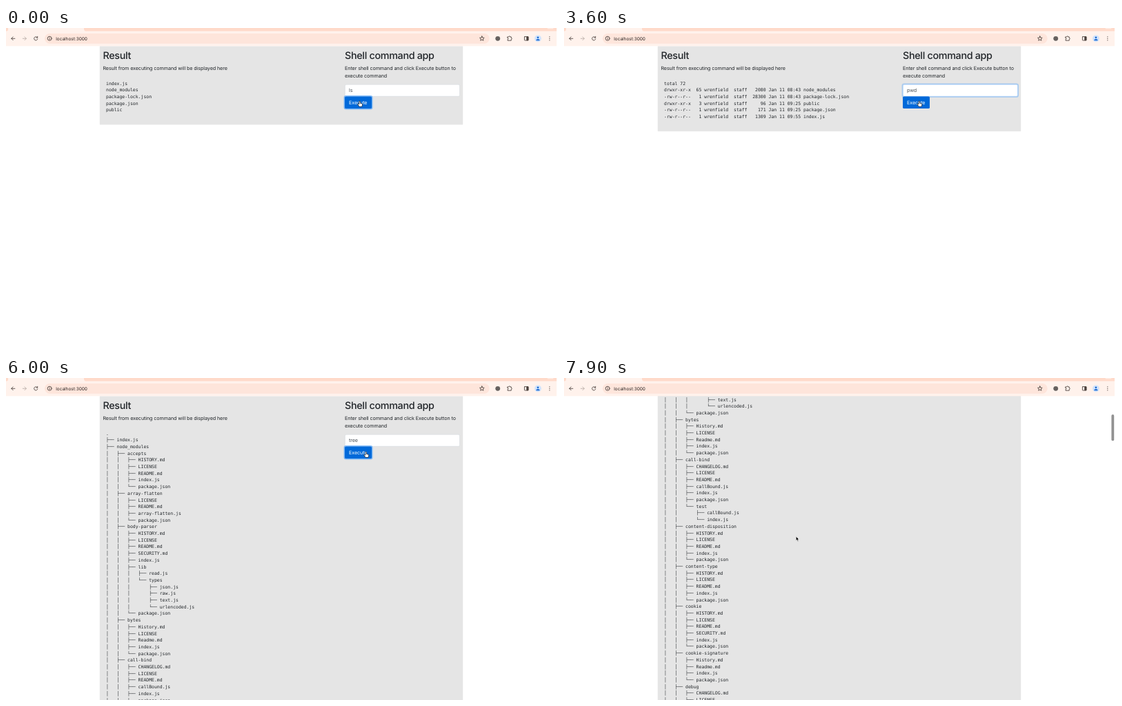
An HTML page that plays this animation: 800 px wide and 468 px high, repeating every 8 s.

```html
<!DOCTYPE html>
<html lang="en">
<head>
<meta charset="utf-8">
<title>Shell command app</title>
<style>
  html, body { margin: 0; width: 100%; height: 100%; overflow: hidden; background: #fff; }
  svg { display: block; width: 800px; height: 468px; }
  text { font: 7.16px Inter, "Open Sans", sans-serif; letter-spacing: -.0105em; fill: #212529;
         text-rendering: geometricPrecision; white-space: pre; }
  .head { font-size: 14.33px; font-weight: 500; letter-spacing: -.022em; }
  .mono text { font: 6.467px "DejaVu Sans Mono", monospace; letter-spacing: 0; }
  .url { font-size: 6.47px; letter-spacing: 0; fill: #2b2523; }
  .field { fill: #495057; }
  .label { fill: #fff; }
  .icon { fill: none; stroke: #463d39; stroke-width: .85; stroke-linecap: round; stroke-linejoin: round; }
</style>
</head>
<body>
<svg viewBox="0 0 800 468">
  <g id="page">
    <rect id="panel" x="135.8" y="26.3" width="526.4" fill="#e5e5e5"/>
    <text class="head" x="140.4" y="45">Result</text>
    <text x="140.4" y="60.5">Result from executing command will be displayed here</text>
    <g id="out" class="mono"></g>
    <text class="head" x="491" y="45">Shell command app</text>
    <text x="491" y="60.5">Enter shell command and click Execute button to</text>
    <text x="491" y="71.6">execute command</text>
    <rect id="fieldRing" x="490.3" y="81.2" width="168" height="19" rx="2.5" fill="none" stroke="#007bff" stroke-opacity=".25" stroke-width="1.5"/>
    <rect id="field" x="491.3" y="82.2" width="166.2" height="17.1" rx="1.7" fill="#fff" stroke-width=".5"/>
    <rect id="mark" x="497" y="86.6" height="8.7" fill="#b0d4fb"/>
    <text id="cmd" class="field" x="497" y="93.3"></text>
    <rect id="caret" y="86.6" width=".5" height="8.4" fill="#212529"/>
    <rect id="btnRing" x="490.3" y="98.8" width="40.4" height="19" rx="2.5" fill="none" stroke="#268fff" stroke-opacity=".55" stroke-width="1.5"/>
    <rect id="btn" x="491" y="99.5" width="39" height="17.6" rx="1.85"/>
    <text class="label" x="497" y="111">Execute</text>
  </g>

  <rect id="thumb" x="793.4" width="3.8" height="38.3" rx="1.9" fill="#929292"/>

  <g id="toolbar">
    <rect width="798" height="26.3" fill="#fff2ec"/>
    <path d="M0 0H3V2Q3 4.6 0 4.6ZM113 0H798V4.6H116.5Q113 4.6 113 1.5Z" fill="#ffdaca"/>
    <rect x="784.5" y="0" width="9" height="1.6" rx=".8" fill="#ffebe2"/>
    <rect x="56" y="7.9" width="644.6" height="14.8" rx="7.4" fill="#fee5db"/>
    <g class="icon">
      <path d="M12.9 15.3H7.9M10.2 12.9L7.8 15.3L10.2 17.7"/>
      <path d="M24.3 15.3H29.3M27 12.9L29.4 15.3L27 17.7" stroke="#b9aca6"/>
      <path d="M45.4 13.8A2.6 2.6 0 1 0 45.8 16M45.7 12.3V14.1H43.9"/>
      <circle cx="63.2" cy="15.2" r="3"/>
      <path d="M63.2 15V16.7M63.2 13.6V13.65"/>
      <path id="star"/>
      <path d="M727 12.9H728.7A1 1 0 0 1 730.7 12.9H732.2V14.4A1 1 0 0 1 732.2 16.4V18.2H727V16.4A1 1 0 0 0 727 14.4Z"/>
      <rect x="751.4" y="12.6" width="5.6" height="5.4" rx=".5"/>
      <path d="M755 12.8H756.8V17.8H755Z" fill="#463d39"/>
    </g>
    <circle cx="712.7" cy="15.3" r="3.4" fill="#66615f"/>
    <circle cx="770.9" cy="15.3" r="4.9" fill="#d0e3fc"/>
    <circle cx="770.9" cy="13.8" r="1.35" fill="#1766cf"/>
    <path d="M768.1 18.2Q768.3 15.9 770.9 15.9T773.7 18.2Z" fill="#1766cf"/>
    <g fill="#463d39">
      <circle cx="787.8" cy="12.8" r=".65"/><circle cx="787.8" cy="15.3" r=".65"/><circle cx="787.8" cy="17.8" r=".65"/>
    </g>
    <text class="url" x="72.2" y="17.6">localhost:3000</text>
  </g>

  <g id="cursor">
    <path id="hand" transform="scale(.9)" fill="#fff" stroke="#000" stroke-width=".7" stroke-linejoin="round"
      d="M-1 .8a.9 .9 0 0 1 1.8 0v2.6l2.6 .6q1.1 .3 1 1.4l-.5 2.6q-.2 .9-1.1 .9h-2.8q-.7 0-1.1-.6l-2.1-3.1q-.3-.7 .3-1 .6-.2 1.1 .4l.8 .7z"/>
    <path id="beam" fill="none" stroke="#111" stroke-width=".75"
      d="M-1.4-3.6Q0-3.6 0-2.8Q0-3.6 1.4-3.6M0-2.8V2.8M-1.4 3.6Q0 3.6 0 2.8Q0 3.6 1.4 3.6M-.8 1.3H.8"/>
    <path id="arrow" fill="#000" stroke="#fff" stroke-width=".55" stroke-linejoin="round"
      d="M0 0V6.1L1.4 4.8L2.4 7.2L3.5 6.7L2.5 4.4H4.4Z"/>
  </g>
</svg>

<script>
const LOOP = 8000, STEP = 100, ROW = 9.7, FIRST = 82.5, USER = 'wrenfield';
const $ = id => document.getElementById(id);
const set = (id, attrs) => { for (const k in attrs) $(id).setAttribute(k, attrs[k]); };
const show = (id, on) => set(id, { visibility: on ? 'visible' : 'hidden' });

const TREE = `index.js node_modules {
  accepts { HISTORY.md LICENSE README.md index.js package.json }
  array-flatten { LICENSE README.md array-flatten.js package.json }
  body-parser { HISTORY.md LICENSE README.md SECURITY.md index.js
    lib { read.js types { json.js raw.js text.js urlencoded.js } } package.json }
  bytes { History.md LICENSE Readme.md index.js package.json }
  call-bind { CHANGELOG.md LICENSE README.md callBound.js index.js package.json
    test { callBound.js index.js } }
  content-disposition { HISTORY.md LICENSE README.md index.js package.json }
  content-type { HISTORY.md LICENSE README.md index.js package.json }
  cookie { HISTORY.md LICENSE README.md SECURITY.md index.js package.json }
  cookie-signature { History.md Readme.md index.js package.json }
  debug { CHANGELOG.md LICENSE Makefile README.md package.json }
  depd { HISTORY.md LICENSE }
} package.json`;

function parse(tokens) {
  const list = [];
  while (tokens.length) {
    const tok = tokens.shift();
    if (tok === '}') break;
    if (tok === '{') list[list.length - 1].kids = parse(tokens);
    else list.push({ name: tok, kids: [] });
  }
  return list;
}

const treeLines = (list, indent = '') => list.flatMap((node, i) => {
  const last = i === list.length - 1;
  return [indent + (last ? '└── ' : '├── ') + node.name,
    ...treeLines(node.kids, indent + (last ? '    ' : '│   '))];
});

const outputs = {
  ls: ['index.js', 'node_modules', 'package-lock.json', 'package.json', 'public'],
  long: ['total 72', ...[
    ['drwxr-xr-x', 65, 2080, '08:43', 'node_modules'],
    ['-rw-r--r--', 1, 28300, '08:43', 'package-lock.json'],
    ['drwxr-xr-x', 3, 96, '09:25', 'public'],
    ['-rw-r--r--', 1, 171, '09:25', 'package.json'],
    ['-rw-r--r--', 1, 1309, '09:55', 'index.js'],
  ].map(([mode, links, size, time, name]) =>
    `${mode}${String(links).padStart(4)} ${USER}  staff${String(size).padStart(7)} Jan 11 ${time} ${name}`)],
  pwd: [`/Users/${USER}/CopilotDemo/JavascriptWithoutCopilot`],
  tree: ['.', ...treeLines(parse(TREE.match(/[{}]|[^\s{}]+/g)))],
};

// Hard state changes: [time, value]
const typed = [[0, 'ls'], [1000, 'ls '], [1100, 'ls -'], [1200, 'ls -l'], [1300, 'ls -lt'], [1400, 'ls -ltr'],
  [2800, 'p'], [2900, 'pw'], [3000, 'pwd'], [4800, 't'], [5000, 'tr'], [5100, 'tre'], [5200, 'tree']];
const focused = [[0, 'btn'], [800, 'field'], [1900, 'btn'], [2500, 'field'], [3700, 'btn'], [4300, 'field'], [5700, 'btn']];
const printed = [[0, 'ls'], [2000, 'long'], [3800, 'pwd'], [5900, 'tree']];
const selected = [[2600, 2800], [4400, 4800]];
const hidden = [[1000, 1600], [2800, 3200], [4800, 5600]];

// Eased pointer path and linear scroll: [time, ...values]
const pointer = [[0, 512.6, 106.3], [100, 512.6, 106.3], [700, 524, 90], [1500, 524, 90], [1900, 507.7, 106],
  [2200, 507.7, 106], [2500, 513, 90], [3100, 513, 90], [3600, 514.9, 106.2], [3900, 514.9, 106.2],
  [4500, 522.3, 87], [4600, 522.3, 87], [4800, 565, 88.5], [5500, 565, 88.5], [5501, 521.8, 107.5],
  [6000, 521.8, 107.5], [6300, 493, 141.3], [6400, 493, 141.3], [6700, 336.3, 230.3]];
const scroll = [[6900, 0], [7000, 8], [7100, 26.4], [7300, 100], [7500, 180], [7700, 243], [7900, 291.4]];

const latest = (steps, t) => steps.filter(s => s[0] <= t).pop();
const within = (spans, t) => spans.some(([a, b]) => t >= a && t < b);
const linear = p => p;
const smooth = p => p * p * (3 - 2 * p);

function tween(keys, t, ease) {
  const i = keys.findIndex(k => k[0] > t);
  if (i < 1) return keys[i < 0 ? keys.length - 1 : 0].slice(1);
  const a = keys[i - 1], b = keys[i], p = ease((t - a[0]) / (b[0] - a[0]));
  return a.slice(1).map((v, n) => v + (b[n + 1] - v) * p);
}

let current = '';
function print(name) {
  if (name === current) return;
  current = name;
  const lines = outputs[name];
  $('out').replaceChildren(...lines.map((line, i) => {
    const el = document.createElementNS('http://www.w3.org/2000/svg', 'text');
    el.setAttribute('x', 145);
    el.setAttribute('y', (FIRST + i * ROW).toFixed(2));
    el.textContent = line.replace(/ /g, '\u00a0');
    return el;
  }));
  const bottom = name === 'tree' ? 5100 : Math.max(121.6, 92 + lines.length * ROW);
  set('panel', { height: bottom - 26.3 });
}

function draw(time) {
  const t = Math.floor(time / STEP) * STEP;
  const [x, y] = tween(pointer, t, smooth);
  const [top] = tween(scroll, t, linear);
  const [keyTime, text] = latest(typed, t);
  const focus = latest(focused, t);
  const inField = focus[1] === 'field';
  const over = x < 491 || x > 657 || y < 82 || y > 117 ? 'arrow'
    : y < 99.5 ? 'beam' : x < 530 ? 'hand' : 'arrow';

  print(latest(printed, t)[1]);
  set('page', { transform: `translate(0 ${-top})` });
  show('thumb', top > 0);
  set('thumb', { y: 27.7 + top * .0868 });

  $('cmd').textContent = text.replace(/ /g, '\u00a0');
  const width = $('cmd').getComputedTextLength();
  const marked = within(selected, t);
  const blink = (t - Math.max(keyTime, focus[0])) % 1000 < 500;
  show('mark', marked);
  set('mark', { width });
  show('caret', inField && !marked && blink);
  set('caret', { x: 497 + width });

  show('fieldRing', inField);
  set('field', { stroke: inField ? '#80bdff' : '#ced4da' });
  show('btnRing', !inField);
  const pointed = over === 'hand' && !within(hidden, t);
  set('btn', { fill: pointed || !inField ? '#0069d9' : '#007bff' });

  set('cursor', { transform: `translate(${x} ${y})` });
  for (const id of ['hand', 'beam', 'arrow']) show(id, id === over && !within(hidden, t));
}

const star = Array.from({ length: 10 }, (_, i) => {
  const a = i * Math.PI / 5, r = i % 2 ? 1.6 : 3.5;
  return `${689.8 + r * Math.sin(a)} ${15.4 - r * Math.cos(a)}`;
});
set('star', { d: `M${star.join('L')}Z` });

const start = performance.now();
function tick() {
  draw((performance.now() - start) % LOOP);
  requestAnimationFrame(tick);
}
tick();
</script>
</body>
</html>
```
